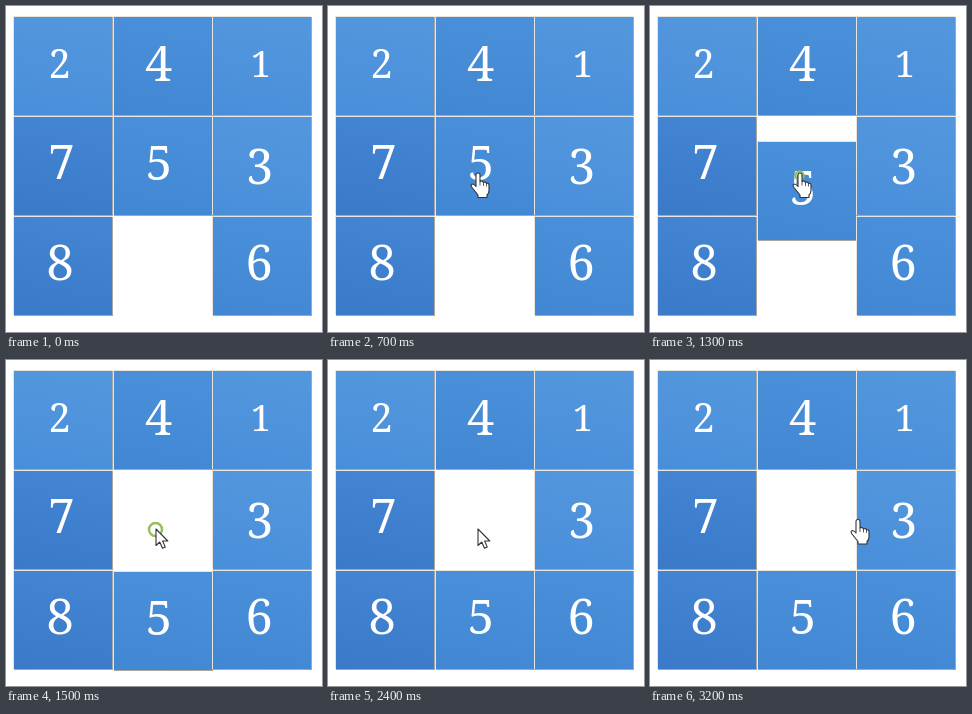
These frames come from a looping animation (316 px wide and 326 px high, 3300 ms). An HTML page with a canvas:

```html
<!DOCTYPE html>
<html lang="en">
<head>
<meta charset="utf-8">
<title>Sliding puzzle</title>
<style>
html, body { margin: 0; width: 100%; height: 100%; overflow: hidden; background: #fff; }
canvas { display: block; }
</style>
</head>
<body>
<canvas id="stage" width="316" height="326"></canvas>
<script>
const ctx = document.getElementById('stage').getContext('2d');
const LOOP = 3300, STEP = 100, PITCH_X = 99.5, PITCH_Y = 100, SIZE = 98;
const FONT = '"Noto Serif", Georgia, serif';

// digit, column, row, centre of the digit in its tile, digit height
const tiles = [
  [2, 0, 0, 45.5, 46, 29], [4, 1, 0, 44.5, 46, 35], [1, 2, 0, 47.5, 47, 27],
  [7, 0, 1, 47.5, 45, 35], [5, 1, 1, 44.5, 45.5, 35], [3, 2, 1, 46.5, 49, 36],
  [8, 0, 2, 46, 45.5, 36], [6, 2, 2, 46, 45, 36]
];
const shades = [['#5297dd', '#498ed9'], ['#4a8fd9', '#4187d3'], ['#4385d2', '#3a7ac9']];

const arrow = new Path2D('M0 0V16.5L3.8 13L6.5 19.3L9.3 18.1L6.6 12H11.8Z');
const hand = new Path2D(
  'M-2 0Q-2 -2 0 -2Q2 -2 2 0V6.5Q4 5 5.5 7.5Q7.5 6 8.5 8.5Q11 7.5 11 10.5V15.5' +
  'Q11 18 9 20V22.5H0V20L-6 12.5Q-8 9.5 -5.5 9Q-4 9 -2 11.5Z');
const knuckles = new Path2D('M2 6.5V10.5M5.5 7.5V11M8.5 8.5V11.5');

const progress = (t, from, to) => Math.min(1, Math.max(0, (t - from) / (to - from)));
const ease = p => (1 - Math.cos(Math.PI * p)) / 2;
const mix = (a, b, p) => a + (b - a) * p;

function drawDigit(digit, cx, cy, height) {
  ctx.font = `100px ${FONT}`;
  const probe = ctx.measureText(digit);
  const em = 100 * height / (probe.actualBoundingBoxAscent + probe.actualBoundingBoxDescent);
  ctx.font = `${em}px ${FONT}`;
  const m = ctx.measureText(digit);
  ctx.fillStyle = '#fff';
  ctx.fillText(digit,
    cx + (m.actualBoundingBoxLeft - m.actualBoundingBoxRight) / 2,
    cy + (m.actualBoundingBoxAscent - m.actualBoundingBoxDescent) / 2);
}

function drawTile([digit, col, row, cx, cy, height], dy) {
  const x = 8 + Math.round(col * PITCH_X), y = 11 + row * PITCH_Y + dy;
  const [top, bottom] = shades[Math.floor((digit - 1) / 3)];
  const fill = ctx.createLinearGradient(x + 30, y, x + 10, y + SIZE);
  fill.addColorStop(0, top);
  fill.addColorStop(1, bottom);
  ctx.fillStyle = '#e9e5dd';
  ctx.fillRect(x - 1, y - 1, SIZE + 1, SIZE + 1);
  ctx.fillStyle = '#aaa6a0';
  ctx.fillRect(x, y, SIZE + 1, SIZE + 1);
  ctx.fillStyle = fill;
  ctx.fillRect(x, y, SIZE, SIZE);
  drawDigit(String(digit), x + cx, y + cy, height);
}

function drawCursor(x, y, pointing) {
  ctx.save();
  ctx.translate(x, y);
  ctx.lineJoin = 'round';
  ctx.fillStyle = '#fff';
  ctx.strokeStyle = '#333';
  ctx.lineWidth = 1.1;
  const shape = pointing ? hand : arrow;
  ctx.fill(shape);
  ctx.stroke(shape);
  if (pointing) {
    ctx.lineWidth = 0.8;
    ctx.stroke(knuckles);
  }
  ctx.restore();
}

function drawRing(t) {
  if (t < 1300 || t >= 1800) return;
  ctx.globalAlpha = 1 - progress(t, 1500, 1900);
  ctx.strokeStyle = '#96bd62';
  ctx.lineWidth = 2.5;
  ctx.beginPath();
  ctx.arc(149.5, 169.5, 4 + (t - 1300) / 80, 0, 2 * Math.PI);
  ctx.stroke();
  ctx.globalAlpha = 1;
}

function draw(t) {
  const slide = ease(progress(t, 1200, 1500)) * PITCH_Y;
  const settle = t >= 1500 && t < 1900 ? 1 : 0;
  ctx.fillStyle = '#fff';
  ctx.fillRect(0, 0, 316, 326);
  for (const tile of tiles) drawTile(tile, tile[0] === 5 ? slide + settle : 0);
  drawRing(t);

  if (t < 100) return;
  const enter = ease(progress(t, 0, 700));
  const leave = ease(progress(t, 2800, 3200));
  const x = mix(mix(-14, 150, enter), 208, leave);
  const y = mix(mix(205, 169, enter), 161.5, leave);
  const overGap = slide > 59 && x < 207;
  drawCursor(x, y, x > 8 && !overGap);
}

function frame(now) {
  draw(Math.floor(now % LOOP / STEP) * STEP);
  requestAnimationFrame(frame);
}
requestAnimationFrame(frame);
</script>
</body>
</html>
```
